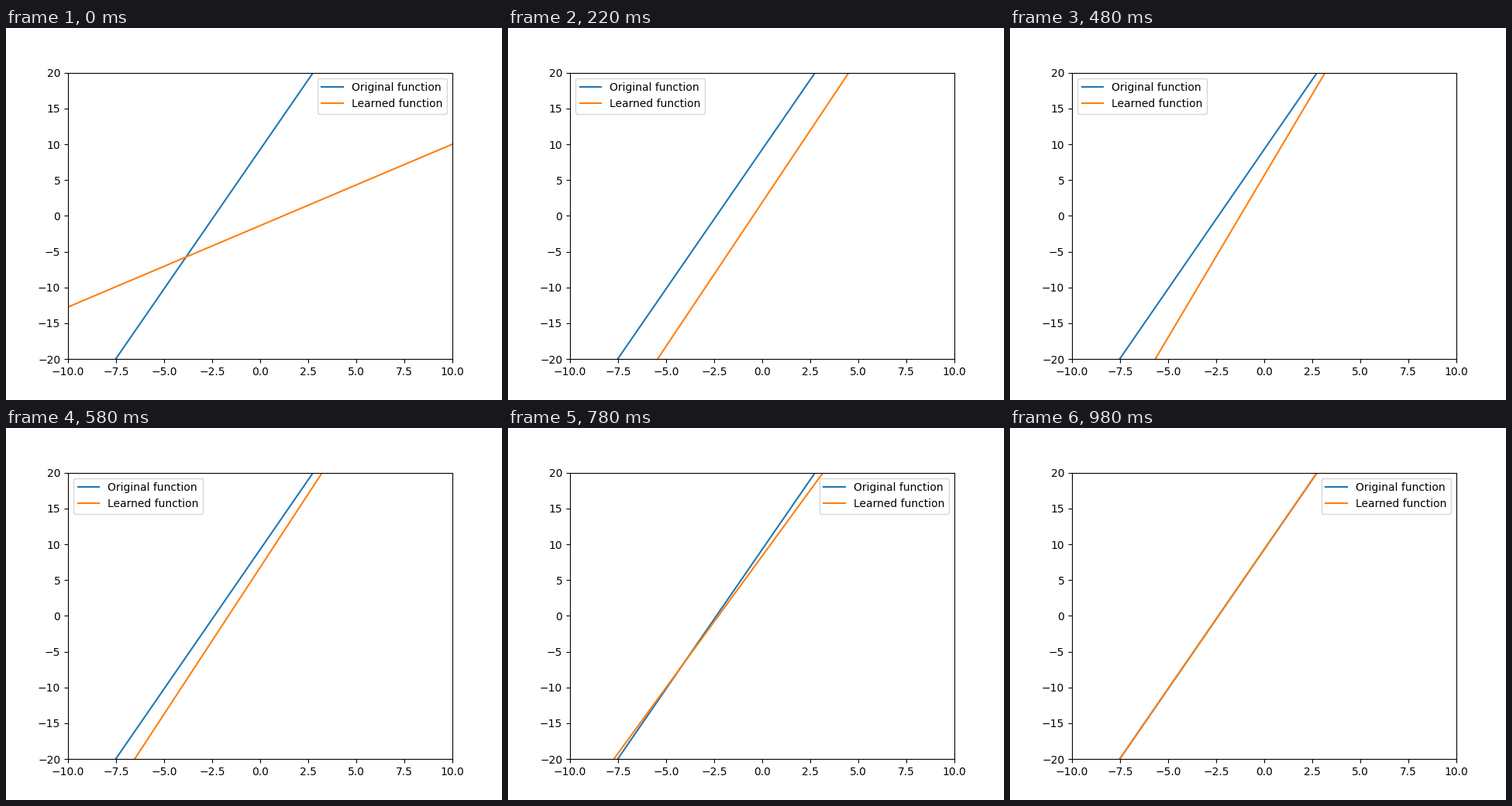
Write a matplotlib script that moves like this. It is 640 px wide and 480 px high and loops after 1000 ms.

```python
import numpy as np
import matplotlib.pyplot as plt
from matplotlib.animation import FuncAnimation

FRAMES = 50
INTERVAL = 20
TRUE_SLOPE, TRUE_INTERCEPT = 3.893, 9.28

# Training progress at a few steps; the fit overshoots in slope, then settles.
STEPS = np.array([0, 7, 11, 19, 29, 39, 49], dtype=float)
SLOPES = [1.137, 3.03, 4.02, 4.77, 4.099, 3.674, TRUE_SLOPE]
INTERCEPTS = [-1.36, 0.575, 1.89, 4.33, 6.78, 8.37, TRUE_INTERCEPT]


def natural_spline(knots, values, t):
    """Evaluate the natural cubic spline through (knots, values) at t."""
    n = len(knots)
    linear = np.column_stack([np.ones(n), knots])
    cubic = np.abs(knots[:, None] - knots) ** 3
    system = np.block([[cubic, linear], [linear.T, np.zeros((2, 2))]])
    coef = np.linalg.solve(system, np.append(values, [0, 0]))
    t = np.asarray(t, dtype=float)
    return np.abs(t[:, None] - knots) ** 3 @ coef[:n] + coef[n] + coef[n + 1] * t


steps = np.arange(FRAMES)
slopes = natural_spline(STEPS, SLOPES, steps)
intercepts = natural_spline(STEPS, INTERCEPTS, steps)

fig, ax = plt.subplots(figsize=(6.4, 4.8), dpi=100)
ax.set_xlim(-10, 10)
ax.set_ylim(-20, 20)

x = np.linspace(-10, 10, 2)
ax.plot(x, TRUE_SLOPE * x + TRUE_INTERCEPT, label="Original function")
learned, = ax.plot(x, slopes[0] * x + intercepts[0], label="Learned function")
ax.legend(loc="best")  # moves to whichever corner the lines leave free


def update(step):
    learned.set_ydata(slopes[step] * x + intercepts[step])
    return learned,


animation = FuncAnimation(fig, update, frames=FRAMES, interval=INTERVAL,
                          repeat=True, repeat_delay=0)
plt.show()
```
